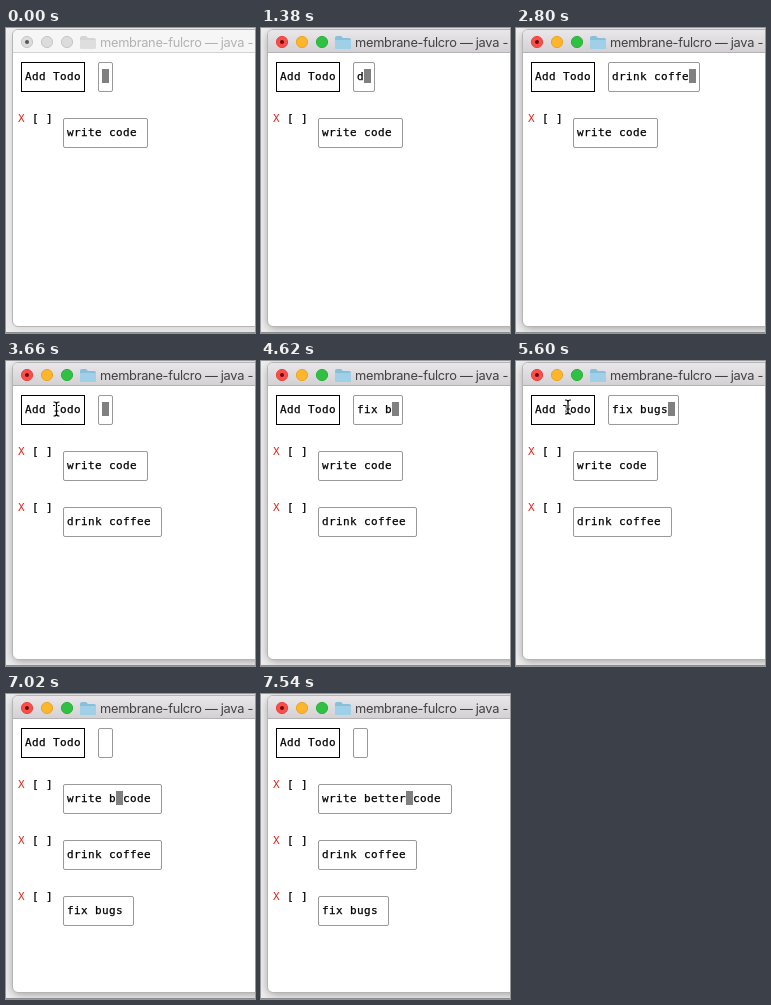
An HTML page for the animation above (8000 ms loop, 249x305 px).

```html
<!DOCTYPE html>
<html lang="en">
<head>
<meta charset="utf-8">
<title>Todo window</title>
<style>
  html, body { margin: 0; width: 100%; height: 100%; overflow: hidden; background: #ededed; }
  svg { display: block; width: 249px; height: 305px; }
  text { white-space: pre; }
  .mono {
    font: 11px "DejaVu Sans Mono", "Liberation Mono", monospace;
    letter-spacing: .378px; stroke: #000; stroke-width: .25px;
  }
  .title { font: 12.8px Inter, "Liberation Sans", sans-serif; letter-spacing: -.27px; }
  .field { fill: #fff; stroke: #999; }
  .block { fill: #808080; }
  .remove { fill: #d8281e; stroke: none; }
</style>
</head>
<body>
<svg viewBox="0 0 249 305">
  <defs>
    <linearGradient id="bar" x2="0" y2="1">
      <stop stop-color="#e9e7e9"/><stop offset="1" stop-color="#d2d0d2"/>
    </linearGradient>
    <filter id="blur" x="-10%" y="-10%" width="120%" height="120%">
      <feGaussianBlur stdDeviation="5"/>
    </filter>
  </defs>
  <rect width="249" height="305" fill="#ededed"/>
  <rect id="shadow" x="7" y="5" width="270" height="295" rx="6" filter="url(#blur)"/>
  <rect y="304" width="249" height="1" fill="#8c8c8c"/>
  <rect x="6.5" y="1.5" width="270" height="297" rx="5.5" fill="#fff" stroke="#b5b5b5"/>
  <path id="bar-fill" d="M7 25V7a5 5 0 0 1 5-5H249V25Z"/>
  <path id="bar-line" d="M7 24.5H249"/>
  <g id="lights"></g>
  <circle cx="21" cy="14" r="2" id="dot"/>
  <g id="folder">
    <path d="M74 10q0-2 2-2h4l2 2h6q2 0 2 2v7q0 2-2 2H76q-2 0-2-2Z" fill="#86c0dd"/>
    <path d="M74 12H90v7q0 2-2 2H76q-2 0-2-2Z" fill="#9fd0e8"/>
  </g>
  <text id="title" class="title" x="94" y="19">membrane-fulcro — java -</text>

  <rect x="15.5" y="34.5" width="63" height="29" fill="#fff" stroke="#000"/>
  <text class="mono" x="19" y="52">Add Todo</text>
  <g id="fields"></g>

  <g id="pointer" fill="none" stroke-linecap="round">
    <path id="beam" d="M-2.5-7Q0-7 0-5Q0-7 2.5-7M0-5V5M-2.5 7Q0 7 0 5Q0 7 2.5 7M-1.5 2H1.5"/>
    <use href="#beam" stroke="#000" stroke-width="1.2"/>
  </g>
</svg>
<script>
const LOOP = 8000, CHAR = 7, ROW = 56;
const ACTIVE = 700, ADD_COFFEE = 3640, ADD_BUGS = 5700, EDIT = 6240;
const $ = id => document.getElementById(id);

function add(parent, tag, attrs, text = "") {
  const el = document.createElementNS("http://www.w3.org/2000/svg", tag);
  set(el, attrs);
  el.textContent = text;
  return parent.appendChild(el);
}
function set(el, attrs) {
  for (const key in attrs) el.setAttribute(key, attrs[key]);
}
const show = (el, on) => el.style.display = on ? "" : "none";
const latest = (steps, t) => steps.findLast(s => s[0] <= t);

// Typed input: [time, text]
const typing = [
  [0, ""], [1380, "d"], [1520, "dri"], [1540, "drin"], [1680, "drinl"],
  [2100, "drin"], [2240, "drink"], [2360, "drink "], [2500, "drink c"],
  [2580, "drink co"], [2640, "drink cof"], [2780, "drink coff"],
  [2800, "drink coffe"], [2940, "drink coffee"], [ADD_COFFEE, ""],
  [4200, "f"], [4280, "fi"], [4380, "fix"], [4460, "fix "],
  [4620, "fix b"], [4680, "fix bu"], [4740, "fix bug"], [4780, "fix bugs"],
  [ADD_BUGS, ""]
];
// Inserted after "write": [time, text]
const insertion = [
  [0, ""], [6740, " "], [7020, " b"], [7160, " be"], [7260, " bet"],
  [7360, " bett"], [7440, " bette"], [7540, " better"]
];
// Pointer paths, visible only between first and last point: [time, x, y]
const paths = [
  [[20, 90, 44], [90, 17, 86], [160, 31, 66], [420, 31, 66], [540, 130, 17], [1380, 130, 17]],
  [[2960, 130, 27], [3500, 51, 39], [3640, 50.5, 48], [4200, 50.5, 48]],
  [[5320, 50.5, 48], [5600, 52, 46], [5760, 53, 46], [6040, 98, 104], [6140, 100, 107], [6740, 100, 107]]
];

function makeField(x, y) {
  const g = $("fields");
  const box = add(g, "rect", { class: "field", x: x + .5, y: y + .5, height: 29, rx: 1.5 });
  const block = add(g, "rect", { class: "block", y: y + 7, width: CHAR, height: 14 });
  const label = add(g, "text", { class: "mono", x: x + 4, y: y + 18 });
  return (text, caret = -1) => {
    set(box, { width: 14 + CHAR * text.length });
    set(block, { x: x + 4 + CHAR * caret });
    show(block, caret >= 0);
    label.textContent = text;
    return [box, block, label];
  };
}

function makeItem(row) {
  const y = 94 + ROW * row;
  const marks = [
    add($("fields"), "text", { class: "mono remove", x: 12, y }, "X"),
    add($("fields"), "text", { class: "mono", x: 26, y }, "[ ]")
  ];
  const field = makeField(57, y - 4);
  return (on, text, caret) => {
    const [box, block, label] = field(text, caret);
    [...marks, box, label].forEach(el => show(el, on));
    if (!on) show(block, false);
  };
}

const input = makeField(92, 34);
const items = [0, 1, 2].map(makeItem);
const lights = [21, 41, 61].map(cx => add($("lights"), "circle", { cx, cy: 14, r: 5.6 }));
const lightColors = [["#fc4e48", "#e8443f"], ["#fdb62c", "#eaa524"], ["#30c144", "#2bb03c"]];

function drawChrome(active) {
  lights.forEach((el, i) => {
    const [fill, stroke] = active ? lightColors[i] : ["#dcdcdc", "#c6c6c6"];
    set(el, { fill, stroke });
  });
  set($("dot"), { fill: active ? "#6b0d0b" : "#555" });
  set($("bar-fill"), { fill: active ? "url(#bar)" : "#f6f6f6" });
  set($("bar-line"), { stroke: active ? "#b4b2b4" : "#d3d3d3" });
  set($("title"), { fill: active ? "#414141" : "#b2b2b2" });
  set($("folder"), { opacity: active ? 1 : .5, style: active ? "" : "filter:grayscale(1)" });
  set($("shadow"), { opacity: active ? .35 : .12 });
}

function drawPointer(t) {
  const path = paths.find(p => t >= p[0][0] && t < p.at(-1)[0]);
  show($("pointer"), path);
  if (!path) return;
  const i = path.findLastIndex(p => p[0] <= t);
  const [t0, x0, y0] = path[i], [t1, x1, y1] = path[i + 1];
  const k = (t - t0) / (t1 - t0), e = k * k * (3 - 2 * k);
  set($("pointer"), { transform: `translate(${x0 + (x1 - x0) * e} ${y0 + (y1 - y0) * e})` });
}

function draw(t) {
  const editing = t >= EDIT;
  const typed = latest(typing, t)[1], extra = latest(insertion, t)[1];
  drawChrome(t >= ACTIVE);
  input(typed, editing ? -1 : typed.length);
  items[0](true, `write${extra} code`, editing ? 5 + extra.length : -1);
  items[1](t >= ADD_COFFEE, "drink coffee");
  items[2](t >= ADD_BUGS, "fix bugs");
  drawPointer(t);
}

// White halo under the pointer's black strokes
$("pointer").prepend(add($("pointer"), "use", { href: "#beam", stroke: "#fff", "stroke-width": 3 }));
$("pointer").querySelector("defs, path").remove();
add(document.querySelector("defs"), "path", {
  id: "beam", d: "M-2.5-7Q0-7 0-5Q0-7 2.5-7M0-5V5M-2.5 7Q0 7 0 5Q0 7 2.5 7M-1.5 2H1.5"
});

const start = performance.now();
function tick() {
  draw((performance.now() - start) % LOOP);
  requestAnimationFrame(tick);
}
tick();
</script>
</body>
</html>
```
